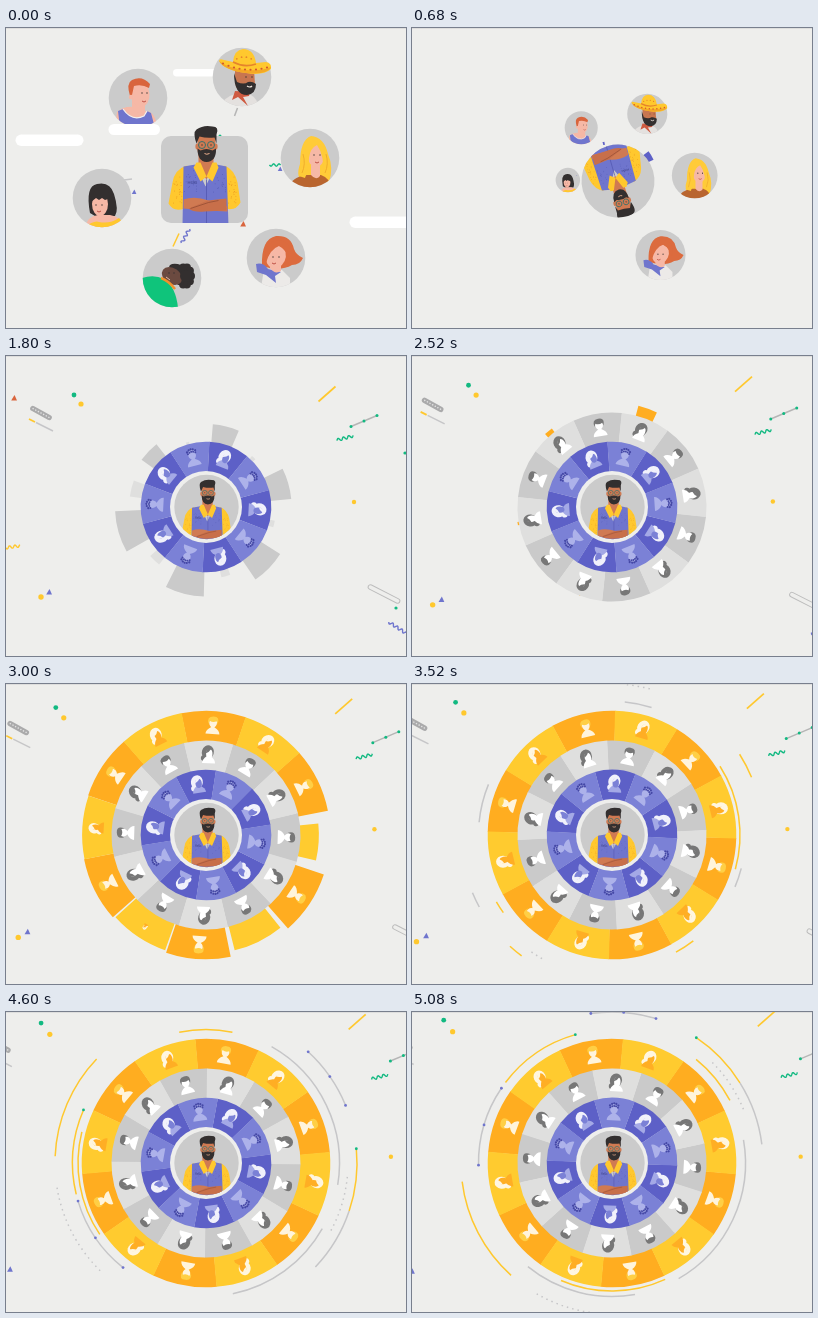
Write an HTML page with a canvas that moves like this. It is 400x300 px and loops after 5.12 s.

```html
<!DOCTYPE html>
<html lang="en">
<head>
<meta charset="utf-8">
<title>Community wheel</title>
<style>
html, body { margin: 0; width: 100%; height: 100%; overflow: hidden; background: #eeeeec; }
canvas { display: block; width: 400px; height: 300px; }
</style>
</head>
<body>
<canvas id="stage"></canvas>
<script>
const LOOP = 5120, CX = 200, CY = 151, RAD = Math.PI / 180;
const BG = '#eeeeec', GREY = '#cbcbcb', LINE = '#c6c6c8', INK = '#332f2f';
const BLUE = '#6f75cd', YELLOW = '#ffc82e', GREEN = '#12b981', RED = '#d9653d', PINK = '#f6b8a6', TAN = '#d07a52';
const canvas = document.getElementById('stage');
const dpr = window.devicePixelRatio || 1;
canvas.width = 400 * dpr;
canvas.height = 300 * dpr;
const c = canvas.getContext('2d');
c.lineJoin = 'round';

const clamp = v => Math.max(0, Math.min(1, v));
const inOut = u => u < 0.5 ? 4 * u ** 3 : 1 - (2 - 2 * u) ** 3 / 2;

// Smooth monotone curve through [time, value] points
function track(t, p) {
  const n = p.length - 1;
  if (t <= p[0][0]) return p[0][1];
  if (t >= p[n][0]) return p[n][1];
  const slope = i => (p[i + 1][1] - p[i][1]) / (p[i + 1][0] - p[i][0]);
  const tangent = i => {
    if (i === 0) return slope(0);
    if (i === n) return slope(n - 1);
    const a = slope(i - 1), b = slope(i);
    return a * b <= 0 ? 0 : 2 * a * b / (a + b);
  };
  let i = 0;
  while (t > p[i + 1][0]) i++;
  const w = p[i + 1][0] - p[i][0], u = (t - p[i][0]) / w, v = 1 - u;
  return p[i][1] * (1 + 2 * u) * v * v + tangent(i) * w * u * v * v
    + p[i + 1][1] * u * u * (3 - 2 * u) - tangent(i + 1) * w * u * u * v;
}

function at(x, y, scale, turn, draw) {
  c.save();
  c.translate(x, y);
  c.rotate(turn * RAD);
  c.scale(scale, scale);
  draw();
  c.restore();
}
function oval(x, y, rx, ry, color, turn = 0) {
  c.beginPath();
  c.ellipse(x, y, rx, ry, turn * RAD, 0, 7);
  c.fillStyle = color;
  c.fill();
}
const dot = (x, y, r, color) => oval(x, y, r, r, color);
function shape(d, color) {
  c.fillStyle = color;
  c.fill(new Path2D(d));
}
function stroke(d, color, width = 1.5) {
  c.strokeStyle = color;
  c.lineWidth = width;
  c.stroke(new Path2D(d));
}
function pill(x, y, w, h, color) {
  c.beginPath();
  c.roundRect(x, y, w, h, h / 2);
  c.fillStyle = color;
  c.fill();
}
function squiggle(x, y, len, turn, color, amp = 1.4) {
  at(x, y, 1, turn, () => {
    c.beginPath();
    for (let i = -len / 2; i <= len / 2; i += 0.5) c.lineTo(i, amp * Math.sin(i * 1.15));
    c.strokeStyle = color;
    c.lineWidth = 1.4;
    c.stroke();
  });
}

// ---- people ----
function eyes(x, y, gap = 6) {
  dot(x, y, 0.7, INK);
  dot(x + gap, y, 0.7, INK);
}
function smile(x, y, color = '#b8473d') {
  stroke(`M${x - 2} ${y}q2 2 4 0`, color, 0.9);
}
// Printed cloth: seeded dots inside a box
function speckle(x, y, w, h, count, color) {
  let seed = 7;
  const rnd = () => (seed = seed * 16807 % 2147483647) / 2147483647;
  for (let i = 0; i < count; i++) dot(x + rnd() * w, y + rnd() * h, 0.5, color);
}

function host() {
  shape('M-18-14Q-30-10-32 3L-36 24Q-31 33-20 29ZM20-14Q30-10 33 3L36 23Q31 32 21 29Z', YELLOW);
  speckle(-31, -4, 9, 30, 22, '#ec9c20');
  speckle(24, -4, 8, 30, 22, '#ec9c20');
  shape('M-22 46L-21-13L-9-15L1 7L12-15L22-13L24 46Z', BLUE);
  speckle(-20, -10, 13, 24, 20, '#595fb9');
  speckle(9, -6, 13, 20, 16, '#595fb9');
  shape('M-6-25H9V-12L2 0L-6-11Z', TAN);
  shape('M-8-17L-4-17L2-3L-4 2L-11-12ZM12-17L8-17L2-3L8 2L14-12Z', YELLOW);
  stroke('M2 0V46', '#5357b0', 0.8);
  c.fillStyle = '#3f4389';
  c.font = '4px Inter, sans-serif';
  c.fillText('Hello', -17, 4);
  shape('M-21 20Q-10 16 4 21L23 27V32L2 31L-21 29Z', TAN);
  shape('M22 19L3 21L-16 29Q-11 33 0 32L22 31Z', '#c86f4a');
  stroke('M-14 29L4 23L14 21', '#8f4a32', 0.7);
  shape('M-7-45H11V-29Q10-19 2-19Q-6-19-7-29Z', TAN);
  oval(-7.5, -33, 1.6, 3, TAN);
  oval(11.5, -33, 1.6, 3, TAN);
  shape('M-7-31L-4-29Q2-32 8-29L11.500-31Q12-18 2-17.500Q-7-18-7-31Z', INK);
  shape('M-8-36Q-12-47-8-50Q-1-55 8-53Q15-53 12-45L12-36L10-42Q2-41-5-43Z', INK);
  stroke('M0-26Q2-24.500 5-26', '#efb18e', 1);
  for (const x of [-2.5, 6.5]) {
    c.beginPath();
    c.arc(x, -34.5, 3.5, 0, 7);
    c.strokeStyle = '#26706f';
    c.lineWidth = 0.9;
    c.stroke();
  }
  eyes(-2.5, -34.5, 9);
}

function curly() {
  shape('M-30 30V0Q-18-4-8 1Q4 9 6 30Z', '#0fc47b');
  for (let i = 0; i < 10; i++) dot(13 + 6 * Math.cos(i * 0.63), -2 + 9 * Math.sin(i * 0.63), 4, INK);
  oval(5, -10, 8, 4, INK, 12);
  oval(0, -2, 11, 8, '#6b4a40', 35);
  stroke('M-11 0Q-3 3 3 11', '#f0912c', 2.5);
  dot(14, -2, 6, INK);
  eyes(-3, -5, 5);
  stroke('M-6-1l4 3', '#e7b9a0', 1);
}
function bob() {
  shape('M-12 15Q-17-12-5-14Q8-17 12-4Q17 12 13 18H-7Z', INK);
  shape('M-17 30Q-15 18-4 17H8Q20 19 23 30Z', PINK);
  shape('M-18 30Q-8 22-3 24Q8 26 17 20L26 30Z', YELLOW);
  oval(-2, 6, 8, 12, PINK);
  shape('M-11 4Q-9-10-1-11Q8-10 8 4L6 1L3 2L0 0L-3 2L-6 0Z', INK);
  eyes(-6, 7);
  smile(-3, 13);
}
function ginger() {
  shape('M-23 30L-21 14Q-14 8-5 9L8 13Q18 14 19 30Z', PINK);
  shape('M-18 30L-20 13L-15 11Q-6 24 6 18L9 13L13 15L17 30Z', BLUE);
  stroke('M-15 11Q-6 24 6 18L9 13', '#f3f1f0', 1.2);
  shape('M-6 0H7V13Q1 18-6 12Z', PINK);
  oval(2, -4, 9.5, 13, PINK, -6);
  shape('M-8-2Q-12-15-6-18Q4-23 12-14L11-10Q4-14-4-12L-6-3Z', RED);
  dot(-7, -1, 2.2, PINK);
  eyes(4, -5, 5);
  smile(6, 3);
}
function sombrero() {
  shape('M-22 30Q-18 20-7 17L9 18Q16 22 16 30Z', '#e4e1df');
  shape('M-7 14L8 15L7 19L1 20L6 29L-4 20L-10 23Z', '#cf5a40');
  shape('M-7-7H12L13 7Q11 17 3 17Q-6 15-7 5Z', '#c87650');
  shape('M-8-4L-5 5Q2 8 6 5Q10 4 14 7Q14 17 5 18Q-8 18-8-4Z', INK);
  eyes(4, 0);
  stroke('M5 9Q8 11 10 9', '#f2e6de', 1.2);
}
function hat() {
  shape('M-23-16Q-23-19-18-17L-9-15Q-8-27 1-28Q12-28 14-14L24-15Q30-14 29-8Q21-1 4-4Q-18-7-23-16Z', YELLOW);
  shape('M-23-16Q-12-8 4-7Q20-6 29-10Q26-2 4-4Q-18-7-23-16Z', '#f4a826');
  stroke('M-9-15Q2-9 14-13', '#e5842c', 1.8);
  for (let i = -4; i < 5; i++) {
    dot(i * 5.5 + 3, -7.5 - i * i * 0.25 + i * 0.5, 1.1, '#d3582f');
    if (i % 2) dot(i * 2.4 + 2, -20 + i * i * 0.2, 0.9, '#e5842c');
  }
}
function blonde() {
  shape('M-6 24Q-15 20-10 6Q-10-18 1-22Q14-21 18-4Q24 10 19 24Z', '#ffcb38');
  shape('M-21 30Q-19 19-3 17H11Q20 20 21 30Z', '#b9652f');
  shape('M1 5H10V18Q6 23 1 17Z', PINK);
  oval(6, -3, 8.5, 12, PINK);
  shape('M-5 16Q-8-16 3-18Q16-16 19 8L13 18Q15-2 7-13Q0-10-1 0Q-1 11-5 20L-11 18Z', '#ffcb38');
  for (const x of [-7, 16]) stroke(`M${x} -4Q${x + 3} 6 ${x - 1} 15`, '#eda52a', 0.8);
  eyes(4, -3, 6);
  smile(7, 4);
}
function redhead() {
  shape('M-14 8Q-15-19 0-22Q15-23 18-9Q20-3 27 0Q24 7 16 7Q4 14-14 8Z', '#dc6b3e');
  shape('M-15 30L-12 11L6 12L14 20V30Z', '#eceae8');
  shape('M-20 6Q-13 4-8 11L5 14L-1 18L0 25L-10 17L-19 14Z', BLUE);
  shape('M-6 4H5V13Q-1 17-6 10Z', PINK);
  oval(0, -1, 9.5, 11.5, PINK, 25);
  shape('M-10 5Q-14-17 3-18Q17-17 14 3Q11-8 3-12Q-6-9-10 5Z', '#dc6b3e');
  eyes(-3, -1);
  smile(-2, 5);
}

// In order of departure
const friends = [
  [166, 250, curly], [96, 170, bob], [132, 70, ginger],
  [236, 49, sombrero, hat], [304, 130, blonde], [270, 230, redhead]
];
function drawFriends(t) {
  const turn = track(t, [[200, 0], [400, 1.5], [680, 9], [950, 30]]) * RAD;
  friends.forEach(([x, y, draw, over], i) => {
    const k = 1 - clamp((t - 160 - 44 * i) / 570) ** 3;
    if (k <= 0) return;
    const a = Math.atan2(y - CY, x - CX) + turn, d = Math.hypot(x - CX, y - CY) * k;
    at(CX + d * Math.cos(a), CY + d * Math.sin(a), k, 0, () => {
      c.save();
      dot(0, 0, 29.3, GREY);
      c.clip();
      draw();
      c.restore();
      if (over) over();
    });
  });
}

function drawHost(t) {
  if (t > 760) dot(CX, CY, 36, BG);
  const half = track(t, [[300, 43.5], [680, 36.5], [1000, 32.2]]);
  const round = Math.min(half, track(t, [[300, 10], [620, 38]]));
  const x = track(t, [[300, 198.5], [680, 206], [1000, 200.5]]);
  const y = track(t, [[300, 151.5], [680, 153], [1000, 151]]);
  const turn = track(t, [[300, 0], [480, 34], [680, 164], [860, 320], [1040, 360]]);
  at(x, y, 1, turn, () => {
    c.beginPath();
    c.roundRect(-half, -half, half * 2, half * 2, round);
    c.fillStyle = GREY;
    c.fill();
    // The hair stands above the frame until the frame is round
    if (round < half) c.rect(-20, -60, 40, 60);
    c.clip();
    const lift = track(t, [[300, 0], [680, 6], [1000, 9.6]]);
    at(0, lift, track(t, [[300, 1], [680, 0.82], [1000, 0.69]]), 0, host);
  });
}

// ---- wheel ----
function manIcon(hair, body, mohawk) {
  shape('M-7 9Q-7 5-1.500 2V-2H1.500V2Q7 5 7 9Z', body);
  oval(0, -2.5, 3.9, 5, body);
  if (mohawk) {
    for (let i = -2; i < 3; i++) {
      dot(i * 2.1, -8 + i * i * 0.5, 1.1, hair);
      dot(i * 1.9, -5.5 + i * i * 0.4, 1, hair);
    }
  } else {
    shape('M-4.500-1Q-7-8 0-8.500Q7-9 4.500-1L3.500-4Q0-2-3.500-4Z', hair);
  }
}
function womanIcon(hair, face, body) {
  oval(-0.5, -2, 6, 7, hair, 15);
  dot(-4.5, 4, 2.8, hair);
  shape('M-6 9Q-6 5-1.500 2H2Q7 5 7 9Z', body);
  oval(1, -0.5, 3.2, 4.6, face);
  shape('M-2.500-1Q-2-7 3-5.500Q1-2-2.500-1Z', hair);
}

const rings = [
  {
    r0: 94, r1: 124.3, n: 12, start: 2342, step: 40, dur: 400, lead: 'man', first: -150, second: -120,
    turn: [[2320, 87], [2520, 80], [3520, 46.5], [4160, 27], [5120, -11.5]],
    man: { fill: '#ffad20', icon: () => manIcon('#ffcf45', '#fff4dc') },
    woman: { fill: '#ffcb2f', icon: () => womanIcon('#fff6e0', '#ffae24', '#ffae24') }
  },
  {
    r0: 65, r1: 94.5, n: 12, start: 1248, step: 30, dur: 800, lead: 'man', first: 90, second: 120,
    turn: [[1240, 92], [1800, 74], [2520, 51], [3520, 12], [4160, -3], [5120, -28]],
    man: { fill: '#cacaca', icon: () => manIcon('#777', '#fff') },
    woman: { fill: '#dfdfde', icon: () => womanIcon('#777', '#fff', '#fff') }
  },
  {
    r0: 36, r1: 65.3, n: 10, start: 505, step: 70, dur: 400, lead: 'woman', first: -72, second: -36,
    turn: [[500, 35], [680, 41], [1800, 75], [2520, 104], [3520, 129], [4160, 145], [5120, 165]],
    man: { fill: '#7b81d6', icon: () => manIcon('#4548a6', '#adb2ea', true) },
    woman: { fill: '#5d60c7', icon: () => womanIcon('#f1f1fb', '#7b81d6', '#a4a9e6') }
  }
];
function drawRing(ring, t) {
  const turn = track(t, ring.turn), mid = (ring.r0 + ring.r1) / 2 + 1, pairs = ring.n / 2;
  for (let j = 0; j < ring.n; j++) {
    const g = inOut(clamp((t - ring.start - j * ring.step) / ring.dur));
    if (!g) continue;
    const leading = j < pairs;
    const kind = ring[leading === (ring.lead === 'man') ? 'man' : 'woman'];
    const a = turn + (leading ? ring.first : ring.second) - (j % pairs) * 360 / pairs;
    const half = (180 / ring.n * g + 0.1) * RAD;
    c.beginPath();
    c.arc(CX, CY, ring.r0 + (ring.r1 - ring.r0) * g, a * RAD - half, a * RAD + half);
    c.arc(CX, CY, ring.r0 - 1, a * RAD + half, a * RAD - half, true);
    c.fillStyle = kind.fill;
    c.fill();
    // Figures pop in once the segment is nearly open
    const pop = clamp((g - 0.9) * 10);
    if (pop) at(CX + mid * Math.cos(a * RAD), CY + mid * Math.sin(a * RAD), pop, a + 90, kind.icon);
  }
}

// ---- orbit lines: radius, from, to (degrees at 4160 ms), colour, style ----
const orbits = [
  [151, -90, -131, YELLOW], [151, 24, -1, LINE, 'beads'], [151, 65, 41, YELLOW, 'tip'],
  [151, 90, 65, LINE], [151, 217, 180, LINE, 'dots'],
  [133.5, -107, -37, LINE], [133.5, 212, 235, YELLOW], [133.5, -17, 32, LINE],
  [133.5, 82, 117, LINE, 'beads'], [133.5, 120, 157, YELLOW, 'tip'],
  [128, -92, -140, YELLOW], [142, 52, 76, LINE, 'dots']
];
function drawOrbits(t) {
  const g = track(t, [[3380, 0], [3520, 0.24], [3800, 0.75], [4160, 1]]);
  if (!g) return;
  for (const [r, from, to, color, style] of orbits) {
    const speed = r === 128 ? -0.168 : (r < 140 ? 0.1055 : -0.1055);
    const spin = (t - 4160) * speed;
    const grow = r === 128 ? Math.max(g, clamp((t - 3360) / 160)) : g;
    const a = (from + spin) * RAD, b = a + (to - from) * grow * RAD;
    c.beginPath();
    c.arc(CX, CY, r, a, b, to < from);
    c.strokeStyle = color;
    c.lineWidth = 1.5;
    c.setLineDash(style === 'dots' ? [1.5, 4] : []);
    c.stroke();
    c.setLineDash([]);
    const bead = (v, col) => dot(CX + r * Math.cos(v), CY + r * Math.sin(v), 1.4 * clamp(g * 2 - 0.7), col);
    if (style === 'tip') bead(b, GREEN);
    if (style === 'beads') [a, (a + b) / 2, b].forEach(v => bead(v, BLUE));
  }
}

// ---- confetti: x, y at rest, drawing around that point ----
const triangle = color => () => shape('M-2.800 2.500L.500-3L3 2.500Z', color);
const bit = (r, color) => () => dot(0, 0, r, color);
const confetti = [
  [8, 42, triangle(RED)],
  [35, 57, () => at(0, 0, 1, 29, () => {
    pill(-12, -2.7, 24, 5.4, '#aaaaab');
    for (let i = -9; i < 10; i += 3) dot(i, 0, 0.8, '#e2e2e2');
  })],
  [68, 39, bit(2.4, GREEN)], [75, 48, bit(2.6, YELLOW)],
  [35, 69, () => { stroke('M-12-6L-6-3', YELLOW, 1.8); stroke('M-5-2.500L12 6', LINE); }],
  [321, 38, () => stroke('M-8.500 7.500L8.500-7.500', YELLOW, 1.7)],
  [358, 65, () => {
    stroke('M-13 5.500L13-5.500', '#b5b5b5');
    for (const i of [-1, 0, 1]) dot(i * 13, -i * 5.5, 1.5, GREEN);
  }],
  [339, 82, () => squiggle(0, 0, 17, -15, GREEN)],
  [399, 97, bit(1.6, GREEN)], [348, 146, bit(2.2, YELLOW)],
  [378, 238, () => at(0, 0, 1, 27, () => { pill(-18, -2.8, 36, 5.6, '#bdbdbd'); pill(-17, -1.8, 34, 3.6, BG); })],
  [390, 252, bit(1.6, GREEN)],
  [392, 272, () => squiggle(0, 0, 22, 33, BLUE)],
  [5, 191, () => squiggle(0, 0, 18, -8, YELLOW)],
  [35, 241, bit(2.7, YELLOW)], [43, 236, triangle(BLUE)]
];
function drawConfetti(t) {
  const s = track(t, [[1000, 0], [1120, 0.35], [1240, 0.68], [1500, 0.92], [1800, 1],
    [2520, 1.087], [3520, 1.185], [4160, 1.225], [5120, 1.277]]);
  if (!s) return;
  for (const [x, y, draw] of confetti) {
    at(CX + (x - CX) * s, CY + (y - CY) * s, Math.min(1, s), 0, draw);
  }
}

// Small sparks left between the portraits at the start
const sparks = [
  [214, 108, bit(1.5, GREEN)],
  [230, 84, () => stroke('M1.500-4L-1.500 4', '#b5b5b5')],
  [269, 137, () => squiggle(0, 0, 11, 0, GREEN, 1.2)],
  [274, 141, () => at(0, 0, 0.8, 0, triangle(BLUE))],
  [128, 164, () => at(0, 0, 0.8, 0, triangle(BLUE))],
  [122, 151.5, () => stroke('M-4 .5L4-.5', LINE)],
  [170, 212, () => stroke('M-3 6.500L3-6.500', YELLOW)],
  [179.5, 208, () => squiggle(0, 0, 16, -62, BLUE)],
  [237, 196, triangle(RED)]
];
function drawSparks(t) {
  const u = clamp(t / 360);
  if (u === 1) return;
  const k = 1 + 0.1 * u;
  for (const [x, y, draw] of sparks) {
    at(CX + (x - CX) * k, CY + (y - CY) * k, 1 - u * u, 0, draw);
  }
}

function drawCloud(t, x, y, w, h) {
  const k = 1 - clamp(t / 540) ** 2;
  if (k > 0) pill(x + w * (1 - k) / 2, y + h * (1 - k) / 2, w * k, h * k, '#fff');
}

function render(t) {
  c.setTransform(dpr, 0, 0, dpr, 0, 0);
  c.fillStyle = BG;
  c.fillRect(0, 0, 400, 300);
  c.fillStyle = '#dededd';
  c.fillRect(0, 0, 400, 1);
  drawCloud(t, 9.5, 106.5, 68, 11.5);
  drawCloud(t, 167, 41, 58, 7.5);
  drawCloud(t, 343.5, 188.5, 70, 11.5);
  drawConfetti(t);
  drawSparks(t);
  drawFriends(t);
  drawCloud(t, 102.5, 96, 51.5, 11);
  drawOrbits(t);
  rings.forEach(ring => drawRing(ring, t));
  drawHost(t);
}

function tick() {
  const t = performance.now() % LOOP;
  render(Math.floor(t / 40) * 40);
  requestAnimationFrame(tick);
}
tick();
</script>
</body>
</html>
```
